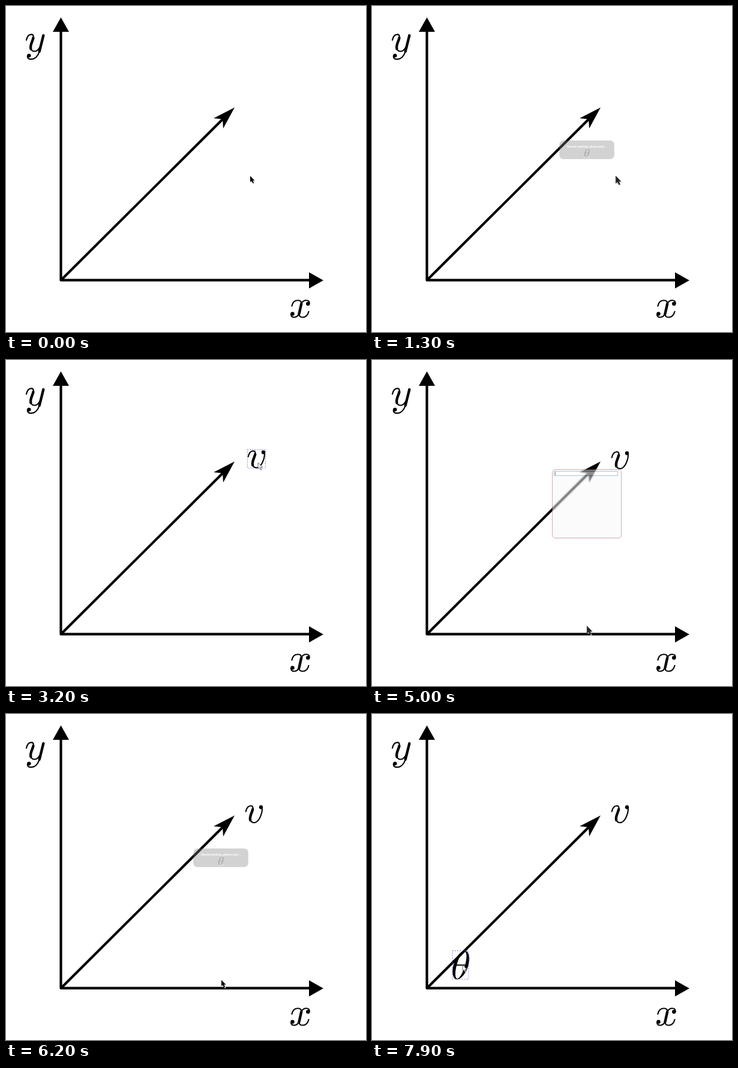
Animation of 600 by 543 pixels, one loop 8 s. Source, as an HTML page:

```html
<!DOCTYPE html>
<html lang="en">
<head>
<meta charset="utf-8">
<title>Labelling a vector</title>
<style>
  html, body { margin: 0; width: 100%; height: 100%; overflow: hidden; background: #fff; }
  svg { position: absolute; left: 0; top: 0; }
  #popup {
    position: absolute; left: 357.7px; top: 239.5px; width: 20.7em; height: 20.7em;
    transform: translate(-50%, -50%); box-sizing: border-box;
    border: 1px solid #a66468; border-radius: .9em;
    background: rgba(247, 247, 247, .87); backdrop-filter: blur(1.5px);
    font-family: "Liberation Sans", sans-serif;
  }
  #field {
    position: absolute; left: .45em; top: .42em; width: 19.1em; height: 1.4em; box-sizing: border-box;
    border: 1px solid #5b9ac0; background: #fff; padding-left: .2em; white-space: pre;
    line-height: 1.2em; color: #111;
  }
  #field::after {
    content: ""; display: inline-block; width: 1px; height: 1em;
    background: #124; vertical-align: -.2em;
  }
  .box { fill: none; stroke: #6c6cc4; stroke-width: .9; stroke-dasharray: 2 2; }
  .thin, .thick { fill: none; stroke: #000; stroke-width: 31; stroke-linecap: round; }
  .thick { stroke-width: 64; }
</style>
</head>
<body>
<svg width="600" height="543" viewBox="0 0 600 543">
  <defs>
    <!-- Letters: hairlines, stems and ball ends on a 1000-unit em -->
    <g id="x"><g transform="scale(.0678 -.0678)">
      <path class="thin" d="M72 284Q100 424 220 424Q306 424 306 345Q345 424 428 424Q506 424 503 350M250 100Q212 8 130 8Q50 8 53 80M250 85Q256 8 336 8Q450 8 487 148"/>
      <path class="thick" d="M306 340L250 90"/>
      <circle cx="469" cy="340" r="48"/><circle cx="88" cy="92" r="48"/>
    </g></g>
    <g id="v"><g transform="scale(.0673 -.0673)">
      <path class="thin" d="M36 284Q66 424 158 424Q212 424 212 361Q212 340 180 255Q142 160 142 110Q142 8 246 8Q310 8 372 108Q436 230 440 330Q442 365 420 395"/>
      <path class="thick" d="M207 340Q203 315 180 255Q142 160 142 110Q142 85 147 70"/>
      <circle cx="411" cy="390" r="47"/>
    </g></g>
    <g id="y"><g transform="scale(.0675 -.0675)">
      <path class="thin" d="M36 284Q66 424 158 424Q212 424 212 361Q212 340 180 255Q142 160 142 110Q142 8 236 8Q310 8 365 105M356 -5Q290 -187 156 -187Q58 -187 62 -110"/>
      <path class="thick" d="M207 340Q203 315 180 255Q142 160 142 110Q142 85 147 70M457 400L358 5"/>
      <circle cx="101" cy="-97" r="47"/>
    </g></g>
    <g id="theta"><g transform="translate(16.500 -23.100) scale(.0665) skewX(-15)">
      <path fill-rule="evenodd" d="M-188 0a188 357 0 1 0 376 0a188 357 0 1 0-376 0M-106 0a106 338 0 1 0 212 0a106 338 0 1 0-212 0"/>
      <path class="thin" d="M-110 0H110"/>
    </g></g>
    <path id="arrow" d="M0 0V10.2L2.4 8.2L4.2 12.2L5.9 11.4L4.2 7.5H7.2Z"/>
    <path id="both" d="M-4.5 0l3.2-2.6v1.7h2.6v-1.7L4.5 0 1.3 2.6V.9h-2.6v1.7Z"/>
  </defs>

  <g fill="none" stroke="#000" stroke-width="4.200" stroke-linejoin="round">
    <path d="M91.5 40V456.700H508M91.500 456.700L365 184.700"/>
  </g>
  <path d="M91.5 19L105 43H78ZM529 457L505 470.5V443.5ZM381 169L362 204L361 188.5L346 187Z"/>
  <use href="#x" x="471.500" y="519"/>
  <use href="#y" x="31.500" y="76"/>

  <g id="vLabel"><use href="#v"/><rect class="box" x="1" y="-30.5" width="30" height="30.5"/></g>
  <g id="thetaLabel"><use href="#theta"/><rect class="box" x="2.3" y="-47" width="27" height="47.5"/></g>
  <g id="handles" fill="#222"></g>
</svg>

<div id="popup"><div id="field"></div></div>

<svg width="600" height="543" viewBox="0 0 600 543">
  <g id="hud">
    <rect x="-104" y="-35" width="208" height="70" rx="15" fill="#808080"/>
    <g fill="#fff" text-anchor="middle" font-family="Liberation Sans, sans-serif">
      <text y="-9" font-size="10.5" font-weight="bold">Started working, please wait…</text>
      <text y="30" font-size="7">cancel</text>
    </g>
    <use href="#theta" transform="translate(-11 28) scale(.7)"/>
  </g>
  <g id="cursor">
    <g id="small">
      <use href="#arrow" x="1.5" y="2" fill="#ccc"/><use href="#arrow"/>
    </g>
    <g id="system">
      <use href="#arrow" transform="translate(.6 1.5) scale(1.2)" fill="#bbb"/>
      <use href="#arrow" transform="translate(-.8 0) scale(1.2)" fill="#222" stroke="#444" stroke-width=".5"/>
    </g>
    <use id="white" href="#arrow" fill="#fff" stroke="#555" stroke-width=".9"/>
    <g id="move" transform="translate(13 14.5)">
      <use href="#both"/><use href="#both" transform="rotate(90)"/>
    </g>
    <g id="type">
      <path d="M-5 0H5M0-5V5" stroke="#222"/>
      <text x="1.5" y="13.5" font-family="Liberation Sans, sans-serif" font-size="9">A</text>
    </g>
  </g>
</svg>

<script>
const $ = id => document.getElementById(id);
const LOOP = 8000, STEP = 100;
const clamp = (v, a, b) => Math.min(b, Math.max(a, v));
const ease = p => p * p * (3 - 2 * p);
const within = (t, a, b) => t >= a && t < b;
const show = (id, on) => { $(id).style.display = on ? "" : "none"; };
const place = (id, x, y) => $(id).setAttribute("transform", `translate(${x} ${y})`);

// Pointer moves: start, end, where to, sideways bend
const moves = [
  [1500, 1900, 303, 382], [1900, 2200, 327, 347], [2200, 2400, 333, 339],
  [2400, 2800, 421.5, 169], [2800, 3200, 420, 171], [3200, 3300, 416, 172.5],
  [3300, 4000, 359, 443, -.1], [6600, 7100, 331, 333, .25],
  [7300, 7400, 339, 341], [7400, 7800, 151, 418]
];

function mouse(t) {
  let x = 407, y = 283;
  for (const [from, to, tx, ty, bend = 0] of moves) {
    const p = ease(clamp((t - from) / (to - from), 0, 1));
    const side = bend * Math.sin(Math.PI * p), dx = tx - x, dy = ty - y;
    x += dx * p - dy * side;
    y += dy * p + dx * side;
  }
  return [x, y];
}

// A label hangs on the pointer between grab and drop
function label(id, t, born, grab, drop, dx, dy) {
  const [x, y] = mouse(clamp(t, grab, drop)), dragged = t > grab && t < drop;
  show(id, t >= born);
  place(id, x + dx, y + dy);
  $(id).lastChild.style.display = dragged ? "" : "none";
  return dragged;
}

// Scale handles around the selected label
for (let i = 0; i < 8; i++) {
  const a = i * Math.PI / 4, dx = Math.round(Math.cos(a)) * 20.5, dy = Math.round(Math.sin(a)) * 20.5;
  $("handles").innerHTML += `<use href="#both" transform="translate(${413.5 + dx} ${166.5 + dy}) rotate(${i * 45})"/>`;
}

function dialog(t) {
  const [open, done, end, text] = t < 3000 ? [700, 1200, 1500, "   v"] : [5000, 5900, 6400, "  \\theta"];
  const n = (t - open) / STEP;
  show("popup", within(t, open, done));
  $("popup").style.fontSize = 10 * (1 - .44 * clamp(1 - n / 3, 0, 1) ** 1.6) + "px";
  $("popup").style.opacity = clamp(.55 + .27 * n, 0, 1);
  $("field").textContent = text.slice(0, Math.max(0, n)).trim();

  const scale = clamp(.22 * (end - t) / STEP, 0, 1);
  show("hud", within(t, done, end));
  $("hud").setAttribute("transform", `translate(358 239.5) scale(${scale})`);
  $("hud").setAttribute("opacity", scale * .78);
}

function draw(t) {
  const dragV = label("vLabel", t, 2100, 2400, 3300, -18.7, 9);
  const dragTheta = label("thetaLabel", t, 7300, 7400, LOOP, -19.3, 23.3);
  const drag = dragV || dragTheta;
  show("handles", within(t, 3300, 3900));
  dialog(t);

  const system = within(t, 700, 1500) || within(t, 5000, 6100);
  const typing = within(t, 300, 700) || within(t, 4600, 5000);
  show("system", system);
  show("type", typing);
  show("white", drag);
  show("small", !system && !typing && !drag);
  show("move", within(t, 2100, 2500) || within(t, 7300, 7500) && !drag);
  place("cursor", ...mouse(t));
}

const start = performance.now();
function frame() {
  const t = (performance.now() - start) % LOOP;
  draw(Math.floor(t / STEP) * STEP);
  requestAnimationFrame(frame);
}
frame();
</script>
</body>
</html>
```
